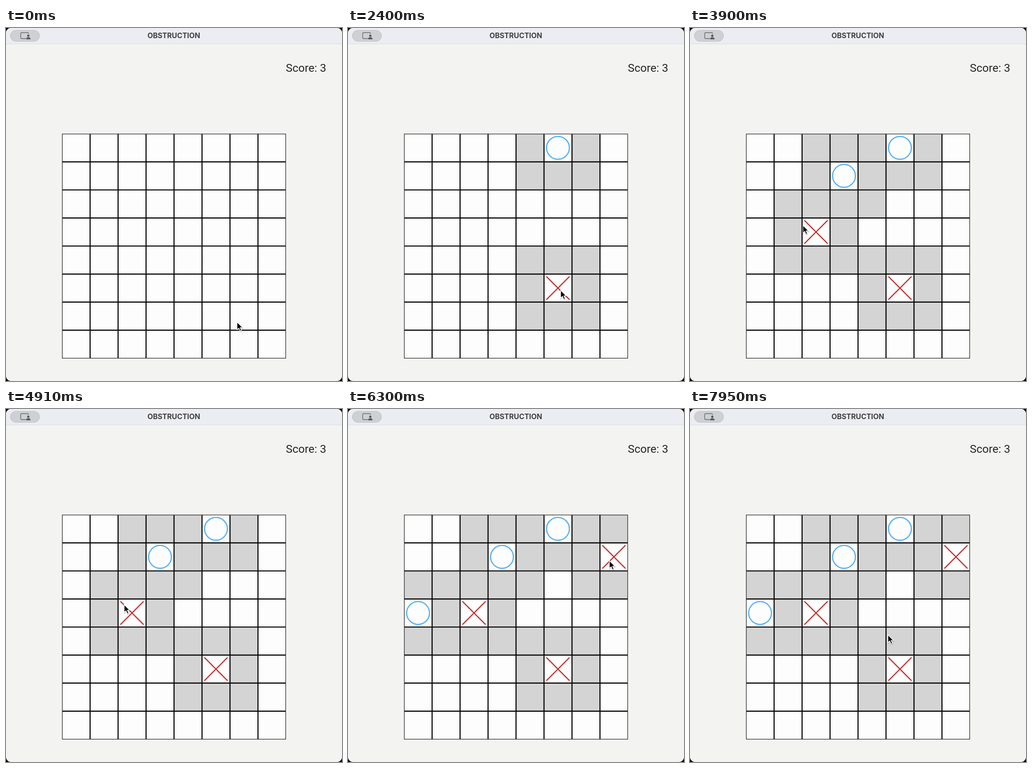
Write an HTML page that moves like this. It is 731 px wide and 766 px high and loops after 8000 ms.

```html
<!DOCTYPE html>
<html lang="en">
<head>
<meta charset="utf-8">
<title>Obstruction</title>
<style>
  html, body { margin: 0; width: 100%; height: 100%; overflow: hidden; background: #000; }
  svg { display: block; width: 100%; height: 100%; }
  .title { font: 700 15.6px Inter, sans-serif; fill: #404042; text-anchor: middle; }
  .score { font: 400 24.4px Roboto, sans-serif; fill: #262628; }
  .blocked { fill: #d4d4d4; }
  .free { fill: #fdfdfd; }
  .cross, .ring { fill: none; stroke-width: 2.5; stroke-linecap: round; }
  .cross { stroke: #c03431; }
  .ring { stroke: #55b0f5; }
</style>
</head>
<body>
<svg viewBox="0 0 731 766">
  <defs><clipPath id="window"><rect width="731" height="766" rx="11"/></clipPath></defs>
  <g clip-path="url(#window)">
    <rect width="731" height="766" fill="#f3f3f2"/>
    <rect width="731" height="34.5" fill="#ebedf3"/>
    <rect y="34" width="731" height="1" fill="#dcdde2"/>
  </g>

  <rect x="9.5" y="5" width="63.5" height="24" rx="12" fill="#cfd0d4" stroke="#bdbec3"/>
  <g fill="none" stroke="#66676b" stroke-width="1.4">
    <path d="M43 23H34.5Q32 23 32 20.5V12.500Q32 10 34.500 10H46.500Q49 10 49 12.500"/>
  </g>
  <g fill="#56575b">
    <circle cx="48.500" cy="16.700" r="2.500"/>
    <path d="M43.500 24.500Q43.500 20 48.500 20T53.500 24.500Z"/>
  </g>

  <text class="title" x="365" y="22">OBSTRUCTION</text>
  <text class="score" x="608.800" y="95">Score: 3</text>

  <rect class="free" x="122.500" y="230" width="486" height="486.500"/>
  <g id="cells"></g>
  <path id="lines" stroke="#060606" stroke-width="2.400"/>
  <rect x="122.500" y="230" width="486" height="486.500" fill="none" stroke="#1c1c1c" stroke-width="1.200"/>
  <g id="marks"></g>

  <g id="cursor">
    <path d="M0 0V17L4 13.300L6.800 19.800L9.800 18.500L7 12.200H12.200Z"
          transform="translate(.5 1.500)" fill="#000" opacity=".18" stroke="#000" stroke-width="2"/>
    <path d="M0 0V17L4 13.300L6.800 19.800L9.800 18.500L7 12.200H12.200Z"
          fill="#000" stroke="#fff" stroke-width="1.300" stroke-linejoin="round"/>
  </g>
</svg>
<script>
  const LOOP = 8000, SIZE = 8, STEP = 60.87, LEFT = 122.1, TOP = 229.6;
  const byId = id => document.getElementById(id);

  const moves = [
    { at: 530, col: 5, row: 5, kind: 'cross' },
    { at: 1230, col: 5, row: 0, kind: 'ring' },
    { at: 3200, col: 2, row: 3, kind: 'cross' },
    { at: 3900, col: 3, row: 1, kind: 'ring' },
    { at: 5605, col: 7, row: 1, kind: 'cross' },
    { at: 6300, col: 0, row: 3, kind: 'ring' }
  ];

  const easeOut = p => 1 - (1 - p) ** 2;
  const smooth = p => p * p * (3 - 2 * p);
  const glide = p => p ** 3 * (10 - 15 * p + 6 * p * p);

  // The pointer is sampled in discrete ticks along each leg.
  const legs = [
    { start: 0, end: 530, ticks: 10, from: [502, 637], to: [462, 568], ease: easeOut },
    { start: 2400, end: 3250, ticks: 16, from: [462, 568], to: [245, 427], ease: glide },
    { start: 4700, end: 5660, ticks: 18, from: [245, 427], to: [568, 328], ease: glide },
    { start: 7420, end: 7950, ticks: 10, from: [568, 328], to: [430, 489], ease: smooth }
  ];

  function add(parent, tag, attrs) {
    const node = document.createElementNS('http://www.w3.org/2000/svg', tag);
    for (const name in attrs) node.setAttribute(name, attrs[name]);
    return parent.appendChild(node);
  }

  const cells = [];
  for (let row = 0; row < SIZE; row++) {
    for (let col = 0; col < SIZE; col++) {
      const node = add(byId('cells'), 'rect', {
        class: 'blocked', x: LEFT + col * STEP, y: TOP + row * STEP, width: STEP, height: STEP
      });
      const near = moves.filter(m => Math.abs(m.col - col) < 2 && Math.abs(m.row - row) < 2);
      const taken = near.some(m => m.col === col && m.row === row);
      cells.push({ node, at: taken || !near.length ? Infinity : near[0].at });
    }
  }

  let grid = '';
  for (let i = 1; i < SIZE; i++) {
    grid += `M${LEFT + i * STEP} 230V716.5M122.5 ${TOP + i * STEP}H608.5`;
  }
  byId('lines').setAttribute('d', grid);

  const marks = moves.map(({ at, col, row, kind }) => {
    const x = LEFT + (col + 0.5) * STEP - 0.1, y = TOP + (row + 0.5) * STEP;
    const node = kind === 'ring'
      ? add(byId('marks'), 'circle', { class: kind, cx: x, cy: y, r: 24.8 })
      : add(byId('marks'), 'path', {
          class: kind, d: `M${x - 24.5} ${y - 24.5}l49 49m0 -49l-49 49`
        });
    return { node, at };
  });

  function pointerAt(t) {
    const leg = legs.filter(l => l.start <= t).pop();
    const raw = (t - leg.start) / (leg.end - leg.start) * leg.ticks;
    const p = leg.ease(Math.min(1, Math.floor(raw + 0.02) / leg.ticks));
    return leg.from.map((v, i) => v + (leg.to[i] - v) * p);
  }

  function draw() {
    const t = performance.now() % LOOP;
    for (const { node, at } of [...cells, ...marks]) {
      node.setAttribute('visibility', t >= at ? 'visible' : 'hidden');
    }
    const [x, y] = pointerAt(t);
    byId('cursor').setAttribute('transform', `translate(${x + 0.6} ${y + 1})`);
    requestAnimationFrame(draw);
  }
  draw();
</script>
</body>
</html>
```
